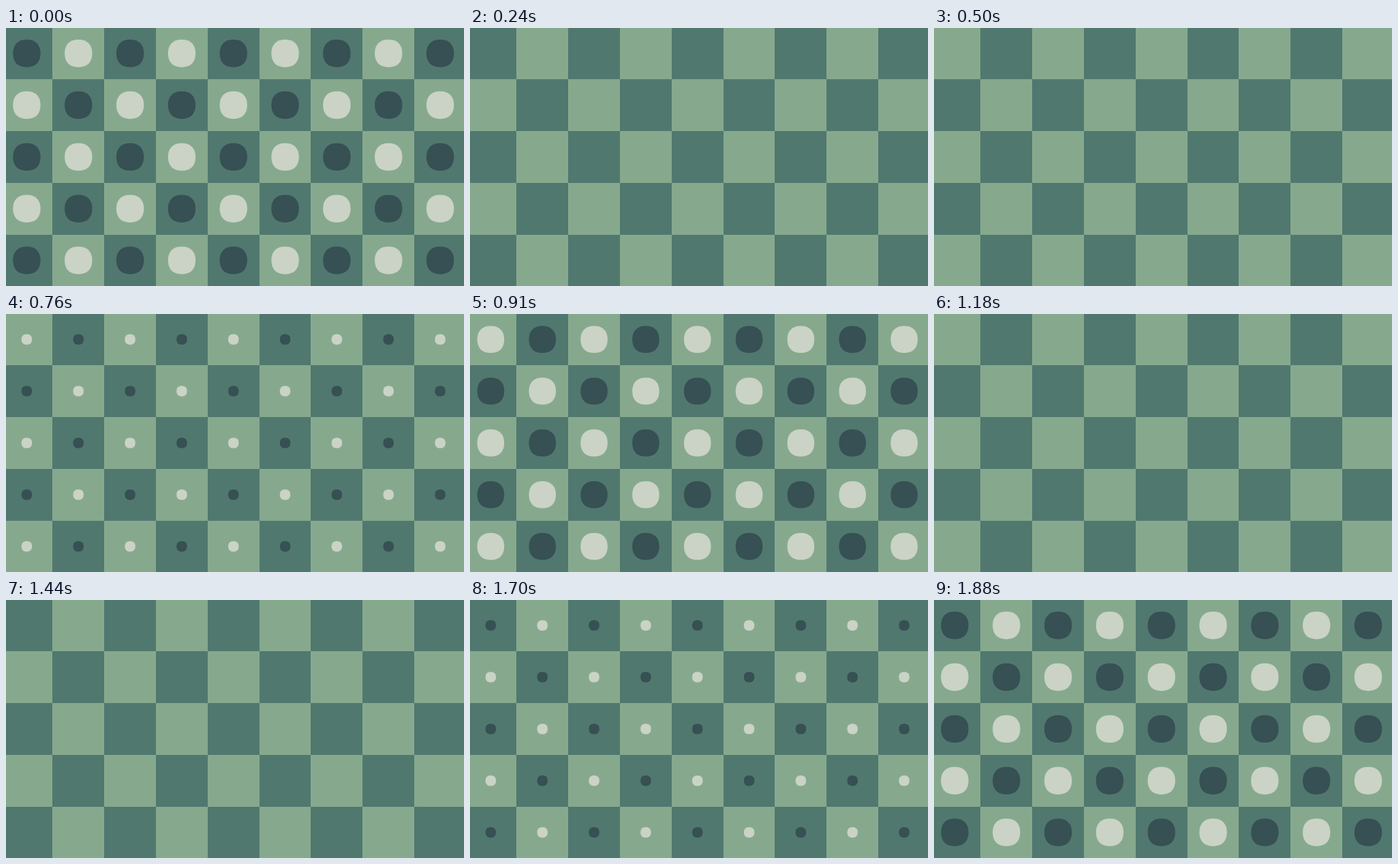
Animation, 672 px wide and 378 px high, one loop 1.91 s. Source, as an HTML page with a canvas:

```html
<!DOCTYPE html>
<html lang="en">
<head>
<meta charset="utf-8">
<title>Checkerboard dots</title>
<style>
html, body { margin: 0; width: 100%; height: 100%; overflow: hidden; background: #50786f; }
canvas { display: block; width: 672px; height: 378px; }
</style>
</head>
<body>
<canvas id="stage" width="672" height="378"></canvas>
<script>
const ctx = document.getElementById("stage").getContext("2d");
const LOOP = 1910, HALF = 940, SWAP = 500, GROW = 700, STEP = 30, STEPS = 8;
const COLS = 9, ROWS = 5, CELL = 75.83, LEFT = -7.5, TOP = -0.7;
const RADIUS = 20.2, BULGE = 0.64;
const TILE = ["#50786f", "#86a98e"];
const DOT = ["#365053", "#cad3c6"];

const edge = (start, i) => Math.round(start + i * CELL);

// Rounded blob, a little squarer than a circle
function blob(x, y, r) {
  const k = r * BULGE;
  ctx.beginPath();
  ctx.moveTo(x + r, y);
  ctx.bezierCurveTo(x + r, y + k, x + k, y + r, x, y + r);
  ctx.bezierCurveTo(x - k, y + r, x - r, y + k, x - r, y);
  ctx.bezierCurveTo(x - r, y - k, x - k, y - r, x, y - r);
  ctx.bezierCurveTo(x + k, y - r, x + r, y - k, x + r, y);
  ctx.fill();
}

// Dots shrink at the start of each half and grow back at its end
function dotScale(t) {
  const steps = t < GROW
    ? STEPS - Math.floor(t / STEP)
    : Math.floor((t - GROW) / STEP);
  const u = Math.min(1, Math.max(0, steps / STEPS));
  return Math.sin(u * Math.PI / 2);
}

function draw(time) {
  const flip = time >= SWAP && time < SWAP + HALF ? 1 : 0;
  const r = RADIUS * dotScale(time >= 2 * HALF ? 0 : time % HALF);
  for (let row = 0; row < ROWS; row++) {
    for (let col = 0; col < COLS; col++) {
      const kind = (row + col + flip) % 2;
      const x = edge(LEFT, col), y = edge(TOP, row);
      ctx.fillStyle = TILE[kind];
      ctx.fillRect(x, y, edge(LEFT, col + 1) - x, edge(TOP, row + 1) - y);
      if (r > 0) {
        ctx.fillStyle = DOT[kind];
        blob(LEFT + (col + 0.5) * CELL, TOP + (row + 0.5) * CELL, r);
      }
    }
  }
}

const start = performance.now();
function tick() {
  draw((performance.now() - start) % LOOP);
  requestAnimationFrame(tick);
}
tick();
</script>
</body>
</html>
```
